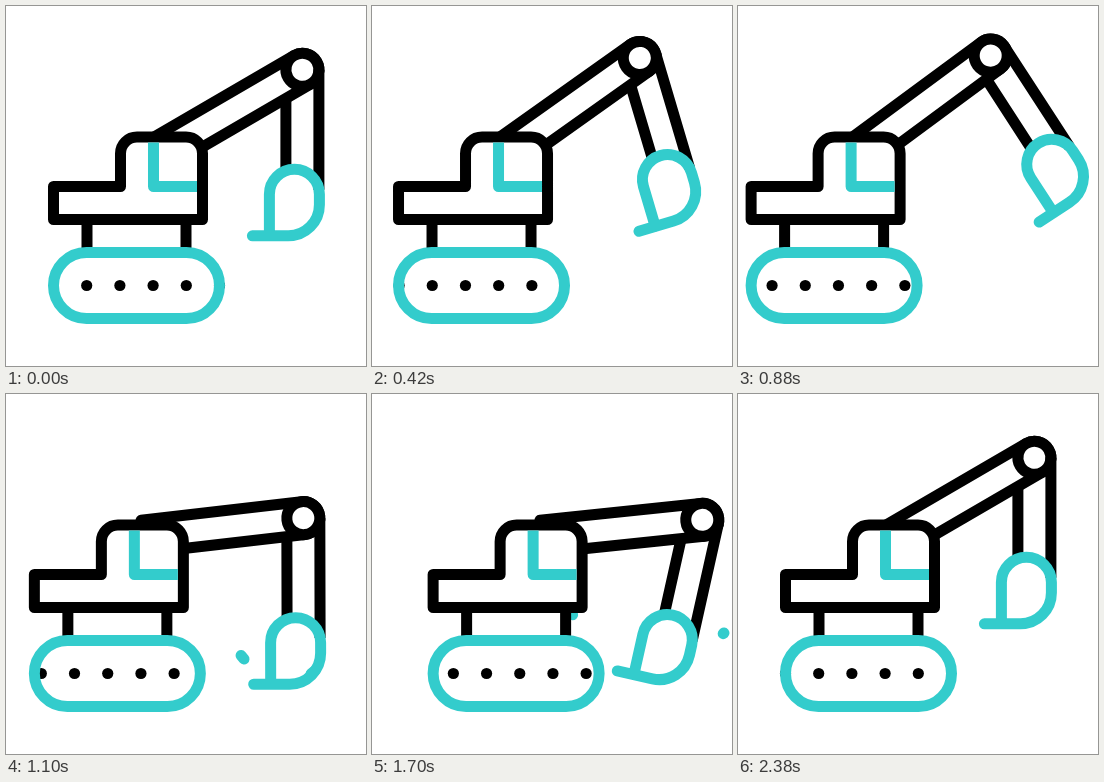
Animation of 360 by 360 pixels, one loop 2400 ms. Source, as an HTML page:

```html
<!DOCTYPE html>
<html lang="en">
<head>
<meta charset="utf-8">
<title>Excavator</title>
<style>
  html, body { margin: 0; width: 100%; height: 100%; overflow: hidden; background: #fff; }
  svg { display: block; width: 100vw; height: 100vh; }
  path, rect, circle, line { fill: none; stroke-width: 11; stroke-linejoin: round; }
  .black { stroke: #000; }
  .teal { stroke: #33cccc; }
  .solid { fill: #fff; }
  .round { stroke-linecap: round; }
  #dots circle { fill: #000; }
</style>
</head>
<body>
<svg viewBox="0 0 360 360">
  <g id="chips">
    <line class="teal round"/>
    <line class="teal round"/>
  </g>
  <g id="machine">
    <g id="arm">
      <g id="stick">
        <path class="black" d="M-16.5 0V99M16.5 0V120"/>
        <path class="teal round" d="M-50 166H-14A31 31 0 0 0 17 135V124.5A25 25 0 0 0 -33 124.5V166"/>
      </g>
      <path class="black solid" d="M-6 -16.5H155.5A16.5 16.5 0 0 1 155.5 16.5H-6Z"/>
      <circle class="black solid" cx="155.5" r="16.5"/>
    </g>
    <path class="black" d="M81 213V243M180 213V243"/>
    <path class="black solid" d="M47.5 213.5V180.5H114.5V147.5A16.5 16.5 0 0 1 131 131H180A16.5 16.5 0 0 1 196.5 147.5V213.5Z"/>
    <path class="teal" d="M147.5 136.5V180.5H191"/>
    <g id="dots"></g>
    <rect class="teal" x="47.5" y="246.5" width="166" height="66" rx="33"/>
  </g>
</svg>
<script>
const LOOP = 2400, GAP = 33.2, DOTS = 5;

// Keys are [time in ms, value]
const drive = [[0, 0], [770, -36.6], [1600, 14.2], [2380, 0]];
const lift = [[0, 0], [800, -9.6], [1265, 36.3], [2380, 0]];
const curl = [[0, 0], [940, -27], [1400, -15], [2360, 0]];
const tread = [[0, 0], [660, -46], [840, -46], [1560, 22], [2330, 0]];
const chipPaths = [[238, 265, 200, 220], [305, 280, 352, 239]];

const $ = id => document.getElementById(id);
const clamp = v => Math.min(1, Math.max(0, v));

function valueAt(keys, t) {
  for (let i = 1; i < keys.length; i++) {
    const [t0, a] = keys[i - 1], [t1, b] = keys[i];
    if (t < t1) return a + (b - a) * (1 - Math.cos(Math.PI * (t - t0) / (t1 - t0))) / 2;
  }
  return keys[keys.length - 1][1];
}

function place(el, attrs) {
  for (const name in attrs) el.setAttribute(name, attrs[name]);
}

const dots = Array.from({ length: DOTS }, () => {
  const dot = document.createElementNS("http://www.w3.org/2000/svg", "circle");
  place(dot, { cy: 279.5, r: 5.6 });
  return $("dots").appendChild(dot);
});

function draw(t) {
  const raise = valueAt(lift, t), armAngle = raise - 30.2;
  place($("machine"), { transform: `translate(${valueAt(drive, t)})` });
  place($("arm"), { transform: `translate(162 142) rotate(${armAngle})` });
  place($("stick"), { transform: `translate(155.5) rotate(${30.2 + valueAt(curl, t)})` });

  const span = GAP * DOTS, shift = valueAt(tread, t);
  dots.forEach((dot, i) => place(dot, { cx: 47.5 + ((shift + i * GAP) % span + span) % span }));

  const head = clamp((t - 1060) / 530), tail = clamp((t - 1180) / 530);
  chipPaths.forEach(([x0, y0, x1, y1], i) => place($("chips").children[i], {
    x1: x0 + (x1 - x0) * tail, y1: y0 + (y1 - y0) * tail,
    x2: x0 + (x1 - x0) * head, y2: y0 + (y1 - y0) * head,
    visibility: head > 0 && tail < 1 ? "visible" : "hidden"
  }));
}

function tick() {
  draw(performance.now() % LOOP);
  requestAnimationFrame(tick);
}
tick();
</script>
</body>
</html>
```
